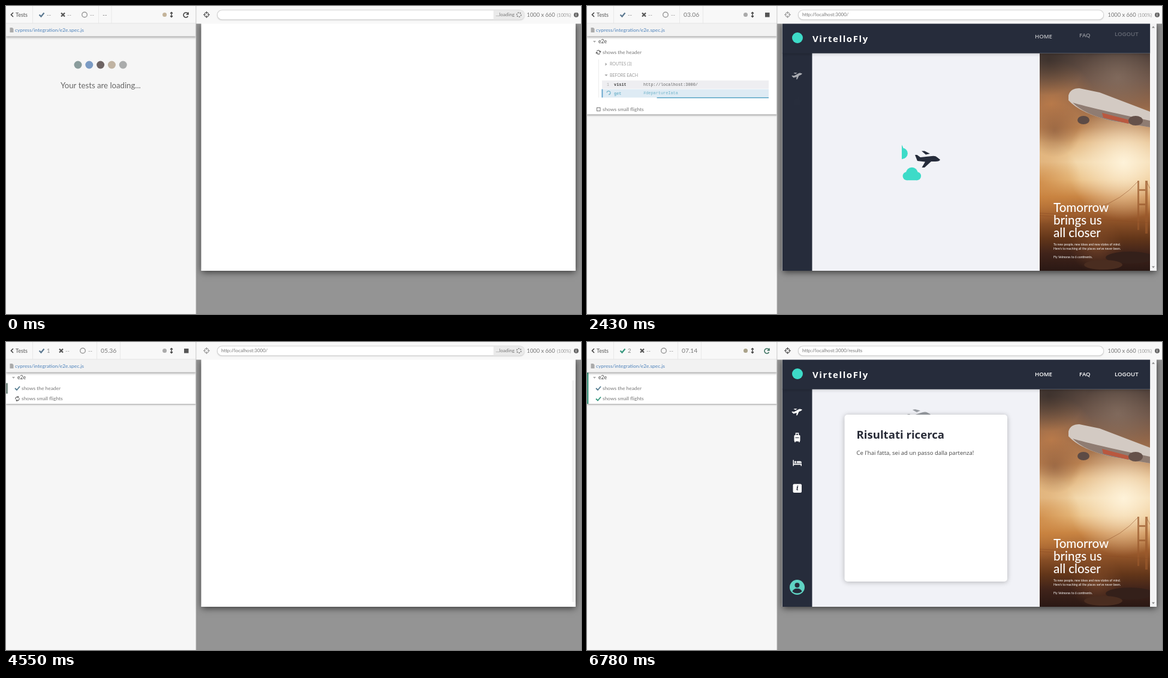
Recreate the animation shown at these times as an HTML page with a canvas. Size 959 px wide and 513 px high, loop 6.85 s.

```html
<!DOCTYPE html>
<html lang="en">
<head>
<meta charset="utf-8">
<title>Test run</title>
<style>
html, body { margin: 0; width: 959px; height: 513px; overflow: hidden; }
canvas { display: block; }
</style>
</head>
<body>
<canvas id="stage" width="959" height="513"></canvas>
<script>
const c = document.getElementById('stage').getContext('2d');
const LOOP = 6850;
const UI = 'Lato, sans-serif', WEB = '"Open Sans", sans-serif', MONO = '"Liberation Mono", monospace';
const NAVY = '#262c3b', TEAL = '#3ddbc8', PAGE = '#f1f2f7';

// Times of the run, in ms
const BEGIN = 470, LOAD1 = 928, RESULTS1 = 2870, CARD1 = 3400, PASS1 = 3500, BLANK = 3540,
      RELOAD = 4300, LOAD2 = 4604, RESULTS2 = 5926, PASS2 = 6320, CARD2 = 6450;
const RUNS = [
  { top: 97, start: 1500, get: 1995, rest: 2500, gap: 34, count: 15, end: 3470 },
  { top: 114.5, start: 4640, get: 4740, rest: 5252, gap: 55, count: 16, end: PASS2 }
];
const CLOCK = [[BEGIN, 1.5], [1240, 2.36], [2430, 3.06], [3880, 4.76], [5080, 5.86], [6000, 6.86], [PASS2, 7.14]];

const API = 'GET 200 /flight-engine/api/';
const STUB = 'GET https://recruitment.shippypro.com/flight-e…';
const ROWS = [
  ['1', 'visit', 'http://localhost:3000/'],
  ['2', 'get', '#departureIata', true],
  ['', '(xhr)', API + 'airports/all'],
  ['', '(xhr)', API + 'airlines/all'],
  ['', '(xhr)', API + 'flights/all'],
  ['', '(req stub)', STUB],
  ['', '(req stub)', STUB],
  ['', '(req stub)', STUB],
  ['3', '-select', 'ALA', true],
  ['4', 'get', '#arrivalIata', true],
  ['5', '-select', 'SUF', true],
  ['6', 'get', '.submit-button', true],
  ['7', '-click', '', true],
  ['', '(new url)', 'http://localhost:3000/results'],
  ['', '(xhr)', 'GET --- /flight-engine/api/flights/from/ALA/to…'],
  ['', 'contains', ':nth-child(1) > .from-to, ALA → TRN']
];

const PLANE = new Path2D('M-21-7h3.500L-12-3 7-5Q13-6 16-3L21 1Q20 4 13 4H6L-5 14H-9.500L-4 4.500-17 3ZM-10-13.500h5L4-9-3-7.500Z');
const CHECK = new Path2D('M-4 0l3 3 5-6');
const CROSS = new Path2D('M-3-3l6 6m0-6l-6 6');
const ARROWS = new Path2D('M0-4V4M-2-2L0-4L2-2M-2 2L0 4L2 2');
const REDO = new Path2D('M3.500-2A4 4 0 1 0 3.500 2M4-4.500V-1H.5');
const SYNC = new Path2D('M-3-1A3 3 0 0 1 2.500-1.500M3.200-3.200V-1H1M3 1A3 3 0 0 1-2.500 1.500M-3.200 3.200V1H-1');

const clamp = v => Math.max(0, Math.min(1, v));

function lerp(points, t) {
  let i = 1;
  while (i < points.length - 1 && t > points[i][0]) i++;
  const [a, u] = points[i - 1], [b, v] = points[i];
  return u + (v - u) * clamp((t - a) / (b - a));
}

function box(x, y, w, h, color, r = 0) {
  c.fillStyle = color;
  c.beginPath();
  c.roundRect(x, y, w, h, r);
  c.fill();
}

function dot(x, y, r, color, ry = r) {
  c.fillStyle = color;
  c.beginPath();
  c.ellipse(x, y, r, ry, 0, 0, 7);
  c.fill();
}

function text(s, x, y, size, color, font = UI, style = '', spacing = 0) {
  c.font = `${style} ${size}px ${font}`;
  c.letterSpacing = spacing + 'px';
  c.fillStyle = color;
  c.textBaseline = 'middle';
  c.fillText(s, x, y);
}

// Runs a drawing at a place, with its own angle, scale and opacity
function at(x, y, draw, angle = 0, scale = 1, alpha = 1) {
  c.save();
  c.translate(x, y);
  c.rotate(angle);
  c.scale(scale, scale);
  c.globalAlpha *= alpha;
  draw();
  c.restore();
}

function line(path, x, y, color, width = 1.2, angle = 0) {
  at(x, y, () => {
    c.strokeStyle = color;
    c.lineWidth = width;
    c.stroke(path);
  }, angle);
}

function shape(path, color) {
  c.fillStyle = color;
  c.fill(typeof path === 'string' ? new Path2D(path) : path);
}

function ring(x, y, r, color, width = 1.2, from = 0, to = 7) {
  c.strokeStyle = color;
  c.lineWidth = width;
  c.beginPath();
  c.arc(x, y, r, from, to);
  c.stroke();
}

function shadow(color, blur, y, draw) {
  c.save();
  c.shadowColor = color;
  c.shadowBlur = blur;
  c.shadowOffsetY = y;
  draw();
  c.restore();
}

const triangle = (x, y, down) => at(x, y, () => shape('M-2.500-1.500H2.500L0 1.500Z', '#aaa'), down ? 0 : -Math.PI / 2);

function rowTime(run, i) {
  return i === 0 ? run.start : i === 1 ? run.get : run.rest + (i - 2) * run.gap;
}

const rowY = (run, i) => run.top + 34 + i * 14.6 + (i === 15 ? 18.4 : 0);

function rowCount(run, t) {
  if (t >= run.end) return 0;
  let n = 0;
  while (n < run.count && t >= rowTime(run, n)) n++;
  return n;
}

function drawRow(run, i, n, t) {
  const [index, name, message, hidden] = ROWS[i], y = rowY(run, i);
  const waiting = (i === 1 && n === 2) || i >= 14, event = name[0] === '(';
  const blue = '#72b4cb', ink = event ? '#8d8d8d' : '#666';
  box(25, y - 7, 278, 13.8, waiting ? '#deebf4' : '#eeeef1');
  if (waiting) {
    box(24.500, y - 7, 1.8, 13.8, '#5b9fca');
    ring(36, y - 1, 3, blue, 1.2, t / 110, t / 110 + 4.6);
    if (i !== 14) {
      const left = Math.min(300, 25 + (t - rowTime(run, i)) * 0.21);
      box(left, y + 6.400, 303 - left, 1.6, '#58a4c6');
    }
  } else text(index, 33, y, 6.5, '#aaa', MONO);
  const style = event ? 'italic' : 'bold';
  text(name, name[0] === '-' ? 49 : 45, y + 0.5, 6.9, waiting && !event ? blue : event ? '#777' : '#444', MONO, style);
  const call = message.startsWith('GET');
  if (call) dot(98, y, 3.8, waiting ? '#8b98a4' : '#5b93c6');
  text(message, call ? 103.500 : 94, y, 6.9, waiting && !event ? blue : ink, MONO, event ? 'italic' : '');
  if (hidden && !waiting) line(new Path2D('M-4 0Q0-4 4 0Q0 4-4 0M-3.500-3L3.500 3M-1 0A1 1 0 0 0 1 0'), 292.500, y, '#aaa', 0.9);
}

function drawRun(run, n, t) {
  if (!n) return;
  box(19, run.top - 8, 0.8, rowY(run, n - 1) - run.top + 15, '#e6e6e6');
  triangle(32, run.top, false);
  text('ROUTES (3)', 38, run.top, 7, '#999');
  triangle(32, run.top + 18.500, true);
  text('BEFORE EACH', 38, run.top + 18.500, 7, '#999');
  if (n > 15) {
    triangle(32, rowY(run, 15) - 15, true);
    text('TEST BODY', 38, rowY(run, 15) - 15, 7, '#999');
  }
  for (let i = 0; i < n; i++) drawRow(run, i, n, t);
}

function drawReporter(t, passed) {
  box(0, 0, 317, 513, '#f6f6f6');
  if (t < BEGIN) {
    ['#8a9c9c', '#7b9bc4', '#6e6464', '#c0b3a2', '#aaacac'].forEach((color, i) => {
      const wave = Math.max(0, Math.sin(Math.max(0, t - 130) / 110 - i * 0.7));
      dot(120 + i * 18.800, 98, 6.500 * (1 - 0.25 * wave), color);
    });
    text('Your tests are loading...', 91, 132.500, 13.2, '#666');
  } else {
    const [first, second] = RUNS.map(run => rowCount(run, t));
    const y = first ? rowY(RUNS[0], first - 1) + 26.500 : 94.500;
    const bottom = second ? rowY(RUNS[1], second - 1) + 18 : y + 8.5;
    shadow('#0006', 3, 1, () => box(0, 51, 316.500, bottom - 51, '#fff'));
    triangle(12.500, 59.500, true);
    text('e2e', 19, 59.500, 8.6, '#444');
    drawRun(RUNS[0], first, t);
    drawRun(RUNS[1], second, t);
    if (passed === 1) box(0, 68.500, 3, 17.500, '#7d9089');
    if (passed === 2) box(0, 51, 2.500, 52, '#469a83');
    ['shows the header', 'shows small flights'].forEach((name, i) => {
      const ty = i ? y : 77;
      if (passed > i) line(CHECK, 19, ty, passed === 2 && i ? '#35977d' : '#557c91', 1.8);
      else if (passed === i) line(SYNC, 19, ty, '#666', 1.2, t / 250);
      else {
        c.strokeStyle = '#777';
        c.lineWidth = 1;
        c.strokeRect(16.500, ty - 2.800, 5.500, 5.500);
      }
      text(name, 26, ty + 0.3, 8.4, '#777');
    });
  }
  shadow('#0006', 4, 1, () => box(0, 29, 316.500, 21.500, '#f2f2f2'));
  shape('M6.500 36h4l2 2v6h-6z', '#aaa');
  text('cypress/integration/e2e.spec.js', 15, 40.300, 8.4, '#4d82bb');
}

function drawTopLeft(t, passed) {
  const running = t >= BEGIN && passed < 2, d = passed ? -3 : 0;
  box(0, 0, 317, 29, '#f8f8f8');
  box(0, 28.500, 317, 0.8, '#ddd');
  line(new Path2D('M2-3.500L-1.500 0L2 3.500'), 10, 14.500, '#444', 1.6);
  text('Tests', 16, 15, 9, '#555');
  line(CHECK, 59.500, 14.500, passed === 2 ? '#35977d' : '#5b7890', 2.2);
  text(passed || '--', 68, 15, 9.5, '#888');
  line(CROSS, 95 + d, 14.500, '#555', 2.2);
  text('--', 102 + d, 15, 9.5, '#999');
  ring(131 + d, 14.500, 4.300, '#999', 1.4);
  text('--', 140 + d, 15, 9.5, '#999');
  let time = '--';
  if (t >= BEGIN) {
    const v = lerp(CLOCK, t);
    time = (passed === 2 ? v : Math.floor((v - 0.06) * 10 + 0.001) / 10 + 0.06).toFixed(2).padStart(5, '0');
  }
  text(time, 161 + d, 15, 10.3, '#777');
  for (const x of [44, 154 + d, t < BEGIN ? 175.500 : 193 + d]) box(x, 0, 0.8, 29, '#e4e4e4');
  dot(264.500, 14.500, 3.5, running ? '#aaa' : passed ? '#aaa38a' : '#c4b49b');
  line(ARROWS, 276, 14.500, '#444', 1.4);
  if (running) box(297, 11, 7.500, 7.500, '#555');
  else line(REDO, 300, 15, passed ? '#3d7261' : '#444', 1.6);
}

function drawTopRight(t, url, loading) {
  const running = t >= BEGIN && t < PASS2;
  box(317, 0, 642, 29.500, '#f8f8f8');
  box(316.500, 0, 0.8, 513, '#bbb');
  const ink = running ? '#999' : '#555';
  ring(334.500, 14.500, 3.600, ink);
  line(new Path2D('M-5.500 0h4M1.500 0h4M0-5.500v4M0 1.500v4'), 334.500, 14.500, ink);
  const w = loading ? 513 : 510;
  shadow('#0002', 2, 1, () => box(352, 6.500, w, 16.500, '#ccc', 8));
  box(352.800, 7.200, w - 1.500, 15, '#fff', 7.500);
  text(url, 359, 14.800, 8, '#777');
  if (loading) {
    box(813, 7, 52, 15.500, '#eaeaea', [0, 8, 8, 0]);
    text('...loading', 817, 15, 8, '#777');
    c.setLineDash([2, 1.6]);
    ring(855.500, 14.500, 3.600, '#777', 1.5, t / 160, t / 160 + 6.2);
    c.setLineDash([]);
  }
  text('1000 x 660', 868.500, 15, 9.3, '#777');
  text('(100%)', 919, 15.300, 7.6, '#999');
  dot(951, 14.800, 4, '#666');
  text('i', 950, 15, 6.5, '#fff', UI, 'bold');
}

function glow(x, y, r, color) {
  const g = c.createRadialGradient(x, y, 0, x, y, r);
  g.addColorStop(0, color);
  g.addColorStop(1, color.slice(0, 7) + '00');
  box(x - r, y - r, 2 * r, 2 * r, g);
}

function drawPhoto() {
  c.beginPath();
  c.rect(0, 0, 184, 362);
  c.clip();
  const sky = c.createLinearGradient(0, 0, 0, 362);
  [[0, '#51423b'], [0.12, '#70574a'], [0.24, '#94684a'], [0.34, '#b98252'], [0.41, '#e0b27a'], [0.5, '#f0d2a2'],
   [0.58, '#e9bd80'], [0.66, '#c98543'], [0.75, '#9a5a2c'], [0.85, '#633619'], [0.92, '#40231a'], [1, '#2a1814']]
    .forEach(s => sky.addColorStop(...s));
  box(0, 0, 184, 362, sky);
  glow(20, 85, 75, '#c9824ab0');
  glow(130, 40, 60, '#8d786a90');
  glow(15, 10, 60, '#2f2724a0');
  glow(140, 182, 95, '#fff4dcf0');
  glow(0, 215, 70, '#c8803cb0');
  glow(25, 128, 45, '#7a4f3880');
  // Aircraft
  shape('M48 70Q51 58 66 58L100 65L184 97V123L120 112Q68 100 48 78Z', '#d3cac3');
  shape('M55 82Q90 92 184 112V123L120 112Q75 102 55 82Z', '#8f7c72');
  shape('M104 99L150 111L148 117L106 107Z', '#b9583f');
  dot(73, 111, 10, '#5d4b45', 7);
  dot(160, 112, 12, '#65514a', 8);
  // Bridge and foreground
  shape('M163 212h3v82h-3zM176 212h4v88h-4zM163 226h17v3h-17zM163 250h17v3h-17z', '#9a592cb0');
  line(new Path2D('M0 266Q110 275 164 213M178 213L184 225M0 270L184 282'), 0, 0, '#8a4a2480', 1);
  glow(95, 320, 45, '#9a5c3470');
  dot(150, 340, 40, '#34201a', 10);
  dot(106, 352, 32, '#4a2d20', 8);
  text('Tomorrow', 23, 258, 20.500, '#fff', UI, '500');
  text('brings us', 23, 278.700, 20.500, '#fff', UI, '500');
  text('all closer', 23, 299.500, 20.500, '#fff', UI, '500');
  text('To new people, new ideas and new states of mind.', 23, 318, 5.1, '#fff');
  text("Here's to reaching all the places we've never been.", 23, 325, 5.1, '#fff');
  text('Fly Velmoras to 6 continents.', 23, 339.500, 5.1, '#fff');
}

function cloud(x, y, scale) {
  at(x, y, () => {
    dot(0, -1.500, 13, TEAL);
    dot(-11, 5, 9.3, TEAL);
    dot(11, 5, 9.3, TEAL);
    box(-13, 2, 26, 12.200, TEAL, 2);
  }, 0, scale);
}

function drawLoader(age) {
  const phase = age / 872 % 1, travel = phase * 154;
  c.save();
  c.beginPath();
  c.rect(525, 215, 81, 85);
  c.clip();
  cloud(626 - travel, 240.500, 1);
  cloud(626 - travel * 0.755, 279.500, 0.75);
  at(568, 258.500 + 3.8 * Math.cos(phase * 4 * Math.PI), () => shape(PLANE, NAVY));
  c.restore();
}

function drawCard(age) {
  const p = clamp(age / 150);
  at(554, 131 - 8 * clamp(age / 300), () => shape(PLANE, '#999da3'), -0.2, 0.9, p);
  c.save();
  c.globalAlpha = p;
  shadow('#0004', 8, 1, () => box(429.500, 121, 271.500, 278, '#fff', 5));
  text('Risultati ricerca', 449.500, 156.600, 18.6, '#282b37', WEB, 'bold');
  text("Ce l'hai fatta, sei ad un passo dalla partenza!", 449.500, 185.800, 9.5, '#444', WEB);
  c.restore();
}

const SIDE_ICONS = [
  () => at(0, 0, () => shape(PLANE, '#fff'), -0.4, 0.42),
  () => {
    box(-5, -4, 10, 10.500, '#fff', 1.5);
    line(new Path2D('M-2-4V-7H2V-4M-3.500 6v2M3.500 6v2'), 0, 0, '#fff', 1.5);
    box(-3, 0, 6, 1, NAVY);
  },
  () => {
    shape('M-7-5h1.500v6H7.500V5H6V3H-5.500V5H-7ZM-.5-3H5Q7.500-3 7.500 0H-.5Z', '#fff');
    dot(-3, -1.500, 1.8, '#fff');
  },
  () => {
    box(-7, -7, 14.500, 14.500, '#fff', 2);
    text('i', -1.8, 0.3, 11, NAVY, '"Noto Serif", serif', 'italic bold');
  }
];

function drawApp(t, p) {
  box(325.500, 29, 614, 412, PAGE);
  const results = t < BLANK ? RESULTS1 : RESULTS2, card = t < BLANK ? CARD1 : CARD2;
  if (t >= card) drawCard(t - card);
  else drawLoader(t - (t >= results ? results : t < BLANK ? LOAD1 : LOAD2));

  const slide = clamp((p - 0.35) / 0.2);
  at(755 + 10 * (1 - slide), 79, drawPhoto, 0, 1, slide);
  at(-10 * (1 - slide), 0, () => box(325.500, 78, 50, 363, NAVY), 0, 1, slide);
  SIDE_ICONS.forEach((icon, i) => at(350.500, [115.500, 159, 201.500, 243.500][i], icon, 0, 1, clamp((p - 0.78 - i * 0.12) / 0.2)));
  at(350.500, 408.500, () => {
    dot(0, 0, 12.500, '#5fd3c3');
    dot(0, -3.500, 4, NAVY);
    shape('M-8 7Q-6 2 0 2T8 7Q5 10 0 10T-8 7Z', NAVY);
  }, 0, 1, clamp((p - 1.4) / 0.2));

  c.save();
  c.globalAlpha = clamp(0.3 + p * 3.1);
  shadow('#0003', 5, 1, () => box(325.500, 29, 614, 49.800, NAVY));
  c.globalAlpha = clamp((p - 0.22) / 0.12);
  dot(351, 53, 9, TEAL);
  text('VirtelloFly', 376, 56, 15, '#fff', WEB, 'bold', 1.6);
  c.restore();
  ['HOME', 'FAQ', 'LOGOUT'].forEach((label, i) => {
    const q = clamp((p - 0.76 - i * 0.04) / 0.2);
    at([747, 821, 880][i], 54.500 - 10 * (1 - q), () => text(label, 0, 0, 9.6, '#fff', WEB, '600'), 0, 1, q);
  });
}

function drawStage(t) {
  box(317, 29, 642, 484, '#949494');
  shadow('#000a', 11, 2, () => box(325.500, 29, 624.500, 412, '#fff'));
  const first = t >= LOAD1 && t < BLANK, second = t >= LOAD2;
  if (first || second) {
    c.save();
    c.beginPath();
    c.rect(325.500, 29, 614, 412);
    c.clip();
    // Page age in seconds, following the pace of the test clock
    drawApp(t, first ? 0.2 + (t - 1240) * 0.7 / 1190 : 0.45 + (t - 5080) / 920);
    c.restore();
    box(939.500, 29, 10.500, 412, '#f3f3f4');
    at(944.500, 35, () => shape('M-2.500 1.500h5L0-1.500Z', '#888'));
    at(944.500, 435, () => shape('M-2.500-1.500h5L0 1.500Z', '#888'));
  } else if (t >= BLANK) box(944, 64, 5.500, 369, '#f2f2f2');
}

function draw(t) {
  const passed = (t >= PASS1) + (t >= PASS2);
  const onResults = (t >= RESULTS1 && t < RELOAD) || t >= 5780;
  const url = t < BEGIN ? '' : 'http://localhost:3000/' + (onResults ? 'results' : '');
  const loading = t < 850 || (t >= BLANK && t < LOAD2);
  drawReporter(t, passed);
  drawTopLeft(t, passed);
  drawStage(t);
  drawTopRight(t, url, loading);
}

function tick() {
  draw(performance.now() % LOOP);
  requestAnimationFrame(tick);
}
tick();
</script>
</body>
</html>
```
